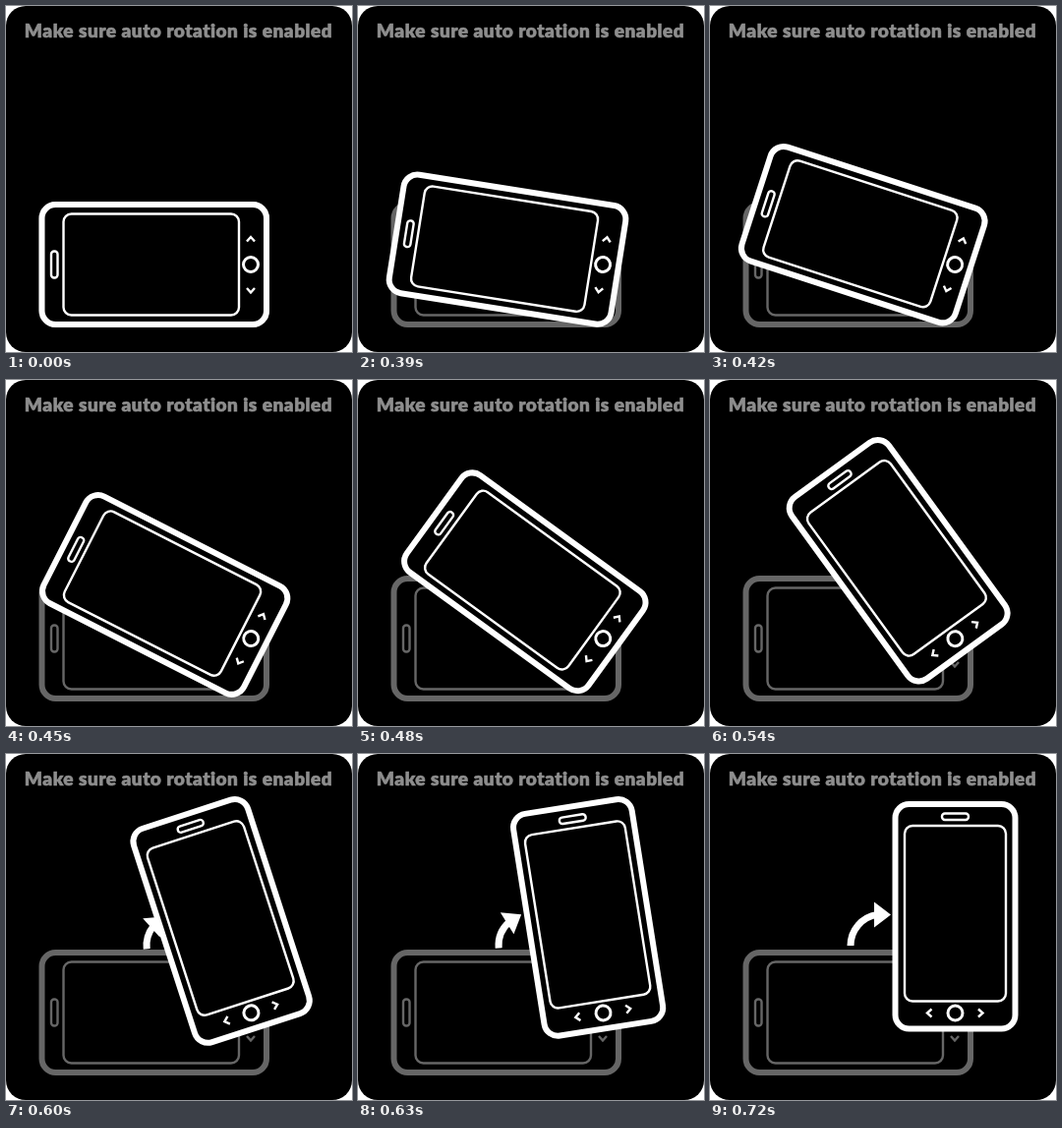
Write an HTML page that moves like this. It is 352 px wide and 352 px high and loops after 0.9 s.

```html
<!DOCTYPE html>
<html lang="en">
<head>
<meta charset="utf-8">
<title>Auto rotation</title>
<style>
  html, body { margin: 0; height: 100%; overflow: hidden; background: #fff; }
  svg { display: block; width: 352px; height: 352px; }
  text {
    font: 900 19px Lato, sans-serif; letter-spacing: .5px;
    fill: #8e8e8e; stroke: #8e8e8e; stroke-width: .6px;
  }
</style>
</head>
<body>
<svg viewBox="0 0 352 352">
  <defs>
    <g id="device" fill="#000" stroke="currentColor" stroke-width="2.4">
      <rect x="36.5" y="202" width="228.5" height="122" rx="14" stroke-width="6"/>
      <rect x="58.5" y="211.5" width="178.5" height="103" rx="8"/>
      <rect x="46" y="249.5" width="6.5" height="27" rx="3"/>
      <circle cx="249" cy="263" r="7.5" stroke-width="3"/>
      <path d="M245 239.5l4-4.5 4 4.5M245 287l4 4.5 4-4.5"/>
    </g>
  </defs>
  <rect width="352" height="352" rx="20"/>
  <text x="175.5" y="32" text-anchor="middle">Make sure auto rotation is enabled</text>
  <use href="#device" color="#666"/>
  <g id="arrow">
    <path id="shaft" fill="none" stroke="#fff" stroke-width="7"/>
    <path id="head" d="M-3 -13L14 0L-3 13Z" fill="#fff"/>
  </g>
  <use id="phone" href="#device" color="#fff"/>
</svg>
<script>
const LOOP = 900, START = 390, STEP = 30, LAST = 12;
const [arrow, shaft, head, phone] =
  ['arrow', 'shaft', 'head', 'phone'].map(id => document.getElementById(id));

// Point on the arrow's circle, in degrees clockwise from its left side
function arcPoint(degrees) {
  const a = degrees * Math.PI / 180;
  return `${175 - 32 * Math.cos(a)} ${195 - 32 * Math.sin(a)}`;
}

function drawArrow(tail, tip) {
  shaft.setAttribute('d', `M${arcPoint(tail)}A32 32 0 0 1 ${arcPoint(tip)}`);
  head.setAttribute('transform', `translate(${arcPoint(tip)}) rotate(${tip - 81})`);
}

function render(now) {
  const t = now % LOOP;
  const step = Math.max(0, Math.min(LAST, Math.floor((t - START) / STEP) + 1));
  const left = LAST - step;
  phone.setAttribute('transform', `rotate(${Math.min(90, step * 9)} 249 263.5)`);
  // The arrow grows out from behind the turning phone
  arrow.style.display = step < 7 ? 'none' : '';
  drawArrow(-1.5 * left, 81 - 10.5 * left);
}

const origin = performance.now();
function tick() {
  render(performance.now() - origin);
  requestAnimationFrame(tick);
}
tick();
</script>
</body>
</html>
```
